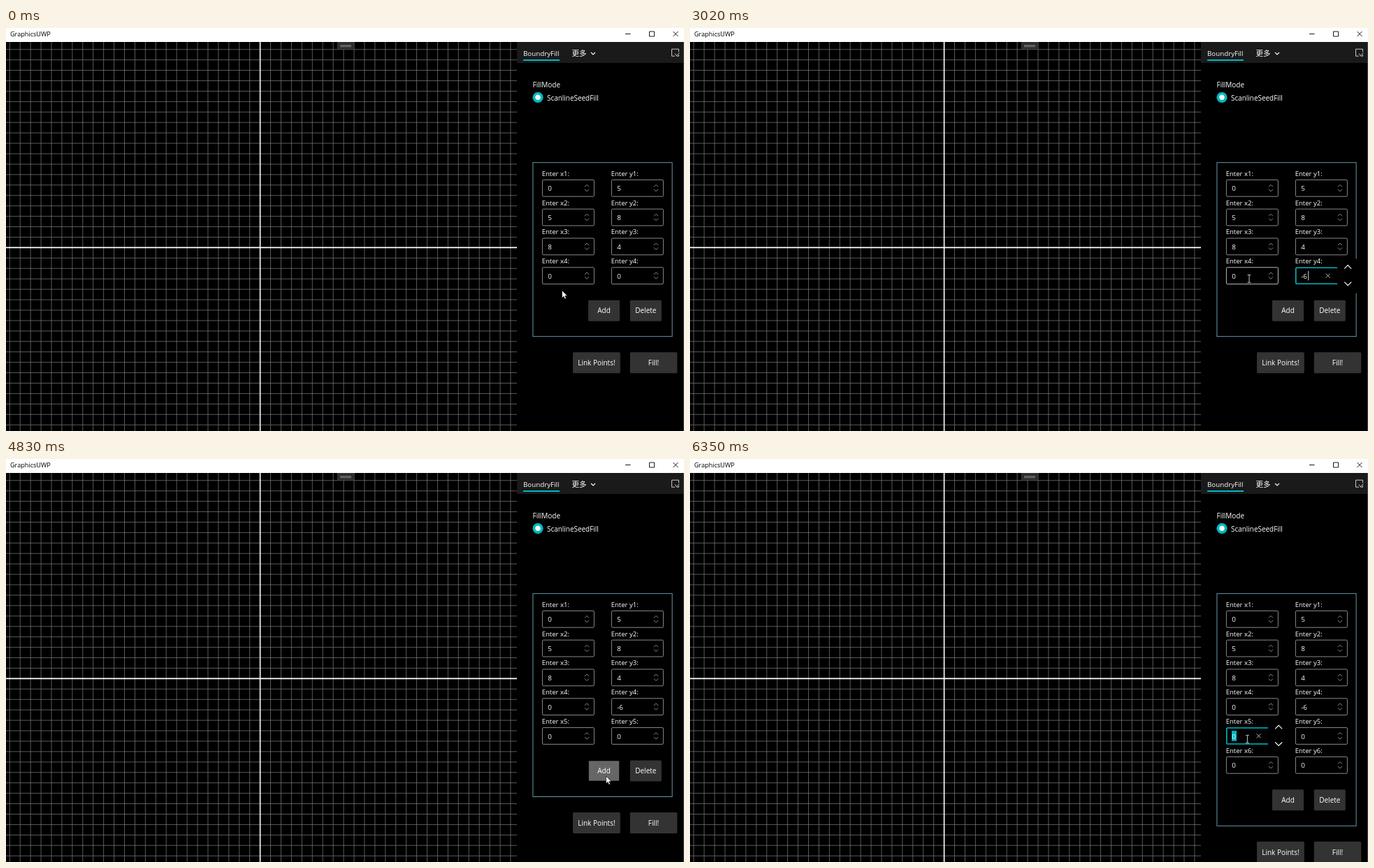
Write an HTML page that moves like this. It is 970x577 px and loops after 8000 ms.

```html
<!DOCTYPE html>
<html lang="en">
<head>
<meta charset="utf-8">
<style>
  html, body { margin: 0; width: 100%; height: 100%; overflow: hidden; background: #000; }
  svg { display: block; width: 100%; height: 100%; }
  text { font-family: "Open Sans", "Noto Sans", "Noto Sans CJK SC", "Noto Sans CJK", sans-serif; fill: #fff; }
</style>
</head>
<body>
<svg viewBox="0 0 970 577">
  <g id="fixed"></g>
  <g id="live"></g>
</svg>
<script>
const LOOP = 8000, PITCH = 41.8, TEAL = '#00b7c3';
const COLUMNS = { x: 767, y: 866 };

const rect = (x, y, w, h, fill, extra = '') =>
  `<rect x="${x}" y="${y}" width="${w}" height="${h}" fill="${fill}" ${extra}/>`;
const line = (d, color = '#fff', width = 1) =>
  `<path d="${d}" fill="none" stroke="${color}" stroke-width="${width}"/>`;
const label = (x, y, str, size = 9.6, extra = '') =>
  `<text x="${x}" y="${y}" font-size="${size}" ${extra}>${str}</text>`;
const chevron = (x, y, half, rise, color, width) =>
  line(`M${x - half} ${y + rise / 2}l${half} ${-rise}l${half} ${rise}`, color, width);
const cross = (x, y, r, color) =>
  line(`M${x - r} ${y - r}l${2 * r} ${2 * r}m0 ${-2 * r}l${-2 * r} ${2 * r}`, color, .9);

function gridLines() {
  const step = 14.93;
  let d = '';
  for (let x = 363.6 - 24 * step; x < 731; x += step) d += `M${x.toFixed(2)} 20V577`;
  for (let y = 314.4 - 19 * step; y < 577; y += step) d += `M0 ${y.toFixed(2)}H731`;
  return line(d, '#787878', .75);
}

function fixedParts() {
  return gridLines() +
    line('M363.6 20V577M0 314.4H731', '#fff', 1.6) +
    rect(474.5, 20, 23.5, 10.5, '#2d2d2d', 'stroke="#444" stroke-width=".7"') +
    rect(478, 24, 16, 3.4, '#606060') +
    rect(731, 20, 239, 557, '#000') +
    rect(731, 20, 239, 30, '#1a1a1a') +
    rect(0, 0, 970, 20, '#fff') +
    label(6, 12, 'GraphicsUWP', 9.1, 'style="fill:#000"') +
    line('M886 8.5h7.5M920.5 5h7v7h-7z', '#000', .9) +
    cross(958, 8.5, 3.5, '#000') +
    label(740, 39.7, 'BoundryFill', 9.75) +
    rect(740, 45, 52, 2, TEAL) +
    label(809.5, 40, '更多', 10.6) +
    chevron(840, 36.5, 3, -3, '#fff', 1.1) +
    line('M957 40.2h-4.5v-10h10v4M957 36.5l2.4 3.2l4-4.2M959.5 40.2h3v-2', '#ddd', .9) +
    label(753.5, 84.5, 'FillMode', 10) +
    `<circle cx="761" cy="99.3" r="7.6" fill="${TEAL}"/><circle cx="761" cy="99.3" r="3.7" fill="#fff"/>` +
    label(774, 103.6, 'ScanlineSeedFill', 9.95) +
    rect(969.3, 20, .7, 557, '#666');
}

// Pointer way points: time, x, y
const POINTER = [
  [0, 795.5, 375.8], [60, 795.5, 375.8], [240, 800, 359], [3700, 800, 359],
  [3960, 861, 409], [4130, 861, 412.3], [4220, 861, 412.3], [4430, 861, 425],
  [4550, 861, 425], [4740, 858.5, 454], [4950, 858.5, 454],
  [5300, 798.5, 401.5], [5410, 797.4, 401], [LOOP, 797.4, 401]
];

function pointerAt(t) {
  const i = POINTER.findIndex(p => p[0] > t);
  const [t0, x0, y0] = POINTER[i - 1], [t1, x1, y1] = POINTER[i];
  const k = (t - t0) / (t1 - t0);
  return { x: x0 + (x1 - x0) * k, y: y0 + (y1 - y0) * k };
}

const between = (t, a, b) => t >= a && t < b;
const inside = (p, x, y, w, h) => p.x >= x && p.x <= x + w && p.y >= y && p.y <= y + h;

function stateAt(t) {
  const pressed = between(t, 4010, 4130) || between(t, 4760, 4900);
  const releasing = between(t, 4130, 4250) || between(t, 4900, 5020);
  return {
    pointer: pointerAt(t),
    rows: t < 4130 ? 4 : t < 4900 ? 5 : 6,
    focus: between(t, 360, 1690) ? 'x4' : between(t, 1690, 4010) ? 'y4' : t >= 6350 ? 'x5' : '',
    selected: t < 1230 || between(t, 1690, 2530) || t >= 6350,
    addColor: pressed ? '#666' : releasing ? '#1a1a1a' : '',
    values: {
      x1: '0', y1: '5', x2: '5', y2: '8', x3: '8', y3: '4',
      y4: t < 2530 ? '0' : t < 3020 ? '-' : '-6'
    }
  };
}

function field(name, x, y, state) {
  const value = state.values[name] || '0';
  const focused = state.focus === name;
  const hovered = inside(state.pointer, x, y, 74.5, 24);
  let out = label(x - .3, y - 5.2, `Enter ${name}:`, 9.55);
  const number = label(x + 8.2, y + 16.3, value, 9.8);
  if (!focused) {
    const color = hovered ? '#d0d0d0' : '#999';
    return out + rect(x + .4, y + .4, 74, 23.8, '#000', `rx="1.5" stroke="${color}" stroke-width=".9"`) +
      number + chevron(x + 64, y + 9, 3, 3, '#aaa', .8) + chevron(x + 64, y + 15.4, 3, -3, '#aaa', .8);
  }
  out += rect(x + 60, y - 12, 34.5, 49.5, '#000') +
    line(`M${x + 60} ${y + .8}H${x + 2}q-1.2 0 -1.2 1.2V${y + 22.6}q0 1.2 1.2 1.2H${x + 60}`, TEAL, 1.6) +
    chevron(x + 75.2, y - .3, 5, 5, '#fff', 1.1) + chevron(x + 75.2, y + 23.8, 5, -5, '#fff', 1.1) +
    cross(x + 46.7, y + 12.3, 3, '#ccc');
  if (state.selected) return out + rect(x + 8, y + 5, 7, 14.5, TEAL) + number;
  const advance = [...value].reduce((sum, c) => sum + (c === '-' ? 3.8 : 5.9), 8.6);
  return out + number + rect(x + advance, y + 5.5, .8, 13.5, '#fff');
}

function button(x, y, w, h, str, pointer, color) {
  const text = label(x + w / 2, y + h / 2 + 3.7, str, 10, 'text-anchor="middle"');
  if (color) return rect(x + .8, y + .8, w - 1.6, h - 1.6, color, 'rx="1"') + text;
  const border = inside(pointer, x, y, w, h) ? 'stroke="#777" stroke-width="1"' : '';
  return rect(x, y, w, h, '#333', `rx="1.5" ${border}`) + text;
}

function pointerShape({ x, y }, overField) {
  const at = `transform="translate(${x.toFixed(1)} ${y.toFixed(1)})"`;
  return overField
    ? `<path ${at} d="M-2.3 -5.5h1.7q.6 0 .6 .7q0 -.7 .6 -.7h1.7M0 -5V5M-2.3 5.5h1.7q.6 0 .6 -.7q0 .7 .6 .7h1.7" fill="none" stroke="#ddd" stroke-width=".9"/>`
    : `<path ${at} d="M0 0V10.8L2.5 8.5L4.1 12.2L5.9 11.4L4.3 7.8H7.6Z" fill="#fff" stroke="#000" stroke-width=".6"/>`;
}

function liveParts(t) {
  const state = stateAt(t), { rows, pointer } = state;
  const shift = (rows - 4) * PITCH;
  let out = rect(753.9, 192.7, 199.2, 249 + shift, 'none', 'stroke="#6fa9bd" stroke-width=".9"');
  let focused = '', overField = false;
  for (let row = 1; row <= rows; row++) {
    const y = 217 + (row - 1) * PITCH;
    for (const [axis, x] of Object.entries(COLUMNS)) {
      const name = axis + row, drawn = field(name, x, y, state);
      if (name === state.focus) focused = drawn; else out += drawn;
      overField = overField || inside(pointer, x, y, 74.5, 24);
    }
  }
  return out + focused +
    button(833, 389.7 + shift, 45, 30, 'Add', pointer, state.addColor) +
    button(892.8, 389.7 + shift, 45, 30, 'Delete', pointer) +
    button(811, 464.2 + shift, 67.8, 30, 'Link Points!', pointer) +
    button(892.8, 464.2 + shift, 67.5, 30, 'Fill!', pointer) +
    pointerShape(pointer, overField);
}

const live = document.getElementById('live');
let shown = '';
document.getElementById('fixed').innerHTML = fixedParts();

function render(now) {
  const markup = liveParts(now % LOOP);
  if (markup !== shown) live.innerHTML = shown = markup;
}

const start = performance.now();
function tick() {
  render(performance.now() - start);
  requestAnimationFrame(tick);
}
tick();
</script>
</body>
</html>
```
